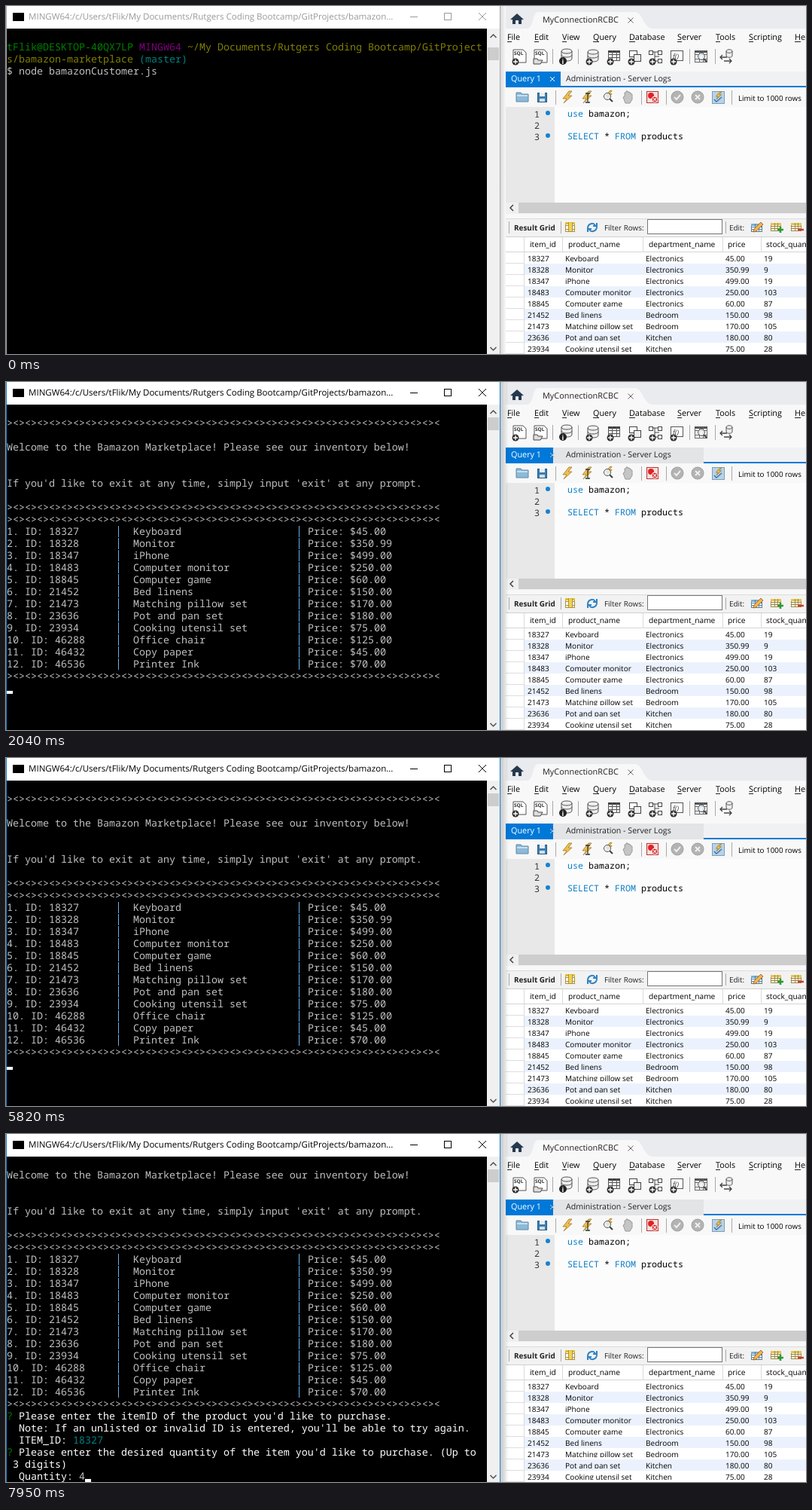
Recreate the animation shown at these times as an HTML page with a canvas. Size 1063 px wide and 462 px high, loop 8 s.

```html
<!DOCTYPE html>
<html lang="en">
<head>
<meta charset="utf-8">
<title>Marketplace terminal</title>
<style>
html, body { margin: 0; width: 100%; height: 100%; overflow: hidden; background: #fff; }
canvas { display: block; }
</style>
</head>
<body>
<canvas id="stage" width="1063" height="462"></canvas>
<script>
const ctx = document.getElementById('stage').getContext('2d');
const UI = '"Open Sans", "Noto Sans", sans-serif';
const MONO = '"Noto Sans Mono", "DejaVu Sans Mono", monospace';
const LOOP = 8000;
const GREY = '#c0c0c0', GREEN = '#008000', TEAL = '#008080';

const products = [
  [18327, 'Keyboard', '45.00', 'Electronics', 19],
  [18328, 'Monitor', '350.99', 'Electronics', 9],
  [18347, 'iPhone', '499.00', 'Electronics', 19],
  [18483, 'Computer monitor', '250.00', 'Electronics', 103],
  [18845, 'Computer game', '60.00', 'Electronics', 87],
  [21452, 'Bed linens', '150.00', 'Bedroom', 98],
  [21473, 'Matching pillow set', '170.00', 'Bedroom', 105],
  [23636, 'Pot and pan set', '180.00', 'Kitchen', 80],
  [23934, 'Cooking utensil set', '75.00', 'Kitchen', 28],
  [46288, 'Office chair', '125.00'],
  [46432, 'Copy paper', '45.00'],
  [46536, 'Printer Ink', '70.00']
];

// [start ms, screen, typed text, cursor visible]
const steps = [
  [0, 'shell', '', 0], [1170, 'shell', '', 1], [1200, 'run', '', 1], [1680, 'run', '', 0],
  [2010, 'intro', '', 1], [2040, 'list', '', 1], [2070, 'item', '', 1], [2190, 'item', '', 0],
  [2640, 'item', '', 1], [3120, 'item', '', 0], [3600, 'item', '', 1], [4080, 'item', '', 0],
  [4230, 'item', '1', 1], [4530, 'item', '18', 1], [4560, 'item', '18', 0],
  [5010, 'item', '183', 1], [5040, 'item', '183', 0], [5400, 'list', '', 1],
  [5430, 'item', '1832', 1], [5520, 'item', '1832', 0], [5820, 'list', '', 1],
  [5850, 'item', '18327', 1], [6000, 'item', '18327', 0], [6210, 'list', '', 1],
  [6240, 'amount', '', 1], [6480, 'amount', '', 0], [6960, 'amount', '', 1],
  [7410, 'amount', '4', 1], [7440, 'amount', '4', 0], [7950, 'amount', '4', 1]
];
// cursor row and column before any typed text
const cursorHome = {
  shell: [3, 26], run: [4, 0], intro: [9, 0], list: [23, 0], item: [25, 11], amount: [26, 12]
};

function rect(x, y, w, h, color) {
  ctx.fillStyle = color;
  ctx.fillRect(x, y, w, h);
}
function box(x, y, w, h, fill, stroke) {
  rect(x, y, w, h, fill);
  ctx.strokeStyle = stroke;
  ctx.lineWidth = 1;
  ctx.strokeRect(x + .5, y + .5, w - 1, h - 1);
}
function text(s, x, y, size = 10.8, color = '#000', family = UI, weight = '') {
  ctx.font = `${weight} ${size}px ${family}`;
  ctx.fillStyle = color;
  ctx.fillText(s, x, y);
}
function path(d, x, y, stroke, width = 1, fill) {
  const p = new Path2D(d);
  ctx.save();
  ctx.translate(x, y);
  if (fill) { ctx.fillStyle = fill; ctx.fill(p); }
  if (stroke) { ctx.strokeStyle = stroke; ctx.lineWidth = width; ctx.stroke(p); }
  ctx.restore();
}
function disc(x, y, r, fill, stroke) {
  ctx.beginPath();
  ctx.arc(x, y, r, 0, 7);
  ctx.fillStyle = fill;
  ctx.fill();
  if (stroke) { ctx.strokeStyle = stroke; ctx.lineWidth = 1; ctx.stroke(); }
}
function cross(x, y, r, color, width = 1) {
  path(`M${-r} ${-r}L${r} ${r}M${r} ${-r}L${-r} ${r}`, x, y, color, width);
}
function plus(x, y) {
  disc(x, y, 4.5, '#333');
  path('M-3 0H3M0-3V3', x, y, '#fff', 1.3);
}
function bolt(x, y, s = 1) {
  path(`M${2 * s} ${-8 * s}L${-6 * s} ${2 * s}H${-s}L${-5 * s} ${8 * s}L${6 * s} ${-2 * s}H${s}L${6 * s} ${-8 * s}Z`, x, y, '#9a7a30', .8, '#f5bd45');
}
function magnifier(x, y) {
  path('M3 3L7 7', x, y, '#444', 2.2);
  disc(x, y, 4.5, 'rgba(235,242,248,.8)', '#555');
}
function cylinder(x, y) {
  path('M-7-5V5C-7 9 7 9 7 5V-5C7-9-7-9-7-5C-7-1 7-1 7-5M-7 0C-7 4 7 4 7 0', x, y, '#555', 1, '#eee');
}
function grid(x, y, w, h, color, head) {
  box(x, y, w, h, '#fff', color);
  rect(x, y, w, 3, head);
  for (let i = 1; i < 3; i++) {
    rect(x, y + Math.round(h * i / 3), w, 1, color);
    rect(x + Math.round(w * i / 3), y, 1, h, color);
  }
}
function separators(xs, y, h) {
  xs.forEach(x => rect(x, y, 1, h, '#a9a9a9'));
}

function mainToolbar() {
  for (const x of [682, 710]) {
    path('M-8-9H5L9-5V8H-8Z', x, 67, '#555', 1, '#fff');
    text('SQL', x - 7, 65, 6.5, '#333', UI, 'bold');
  }
  plus(677, 74);
  path('M-5-3H0L1-1H7L4 4H-5Z', 706, 73, '#444', 1, '#ddd');
  cylinder(745, 65);
  disc(740, 73, 5, '#222');
  text('i', 738.6, 76.5, 9, '#fff', UI, 'bold');
  cylinder(780, 66);
  grid(800, 59, 16, 14, '#555', '#444');
  box(828, 59, 11, 9, '#fff', '#444');
  box(834, 64, 10, 10, '#eee', '#444');
  path('M-6-6H0V6H7M0-6H6M0 0H6', 862, 67, '#444');
  for (const [x, y] of [[854, 59], [866, 59], [866, 70]]) box(x, y, 6, 6, '#fff', '#444');
  box(883, 59, 17, 14, '#fff', '#555');
  text('f()', 886, 70, 9, '#333', UI, 'italic');
  [775, 803, 831, 859, 887].forEach(x => plus(x, 74));
  grid(915, 59, 17, 16, '#666', '#555');
  magnifier(924, 67);
  path('M-4-3V3C-4 6 4 6 4 3V-3C4-6-4-6-4-3C-4 0 4 0 4-3', 961, 63, '#555', 1, '#eee');
  path('M-7 2H2M-4-1L-7 2L-4 5M-2 7H8M5 4L8 7L5 10', 956, 66, '#444', 1.3);
  separators([726, 760, 908, 942], 57, 20);
}

function queryToolbar() {
  path('M-8-6H-2L0-4H8V6H-8Z', 686, 121, '#5b8bab', 1, '#8dbad6');
  rect(679, 118, 14, 2, '#c9e0ee');
  box(706, 115, 13, 13, '#3b7fb0', '#28597f');
  rect(709, 115, 7, 5, '#e8eef4');
  rect(709, 123, 7, 4, '#d2dee8');
  bolt(746, 121);
  bolt(772, 121);
  path('M-3-6H3M0-6V6M-3 6H3', 773, 122, '#333', 1.3);
  bolt(801, 118, .7);
  magnifier(799, 120);
  path('M-6 0L-4-1V-6H-2V-8H0V-7H2V-6H4V-4H6V3L3 8H-3Z', 826, 121, '#999', 1, '#c5c5c5');
  box(851, 113, 16, 16, '#f3dede', '#b33');
  disc(857, 119, 4, '#d22');
  disc(862, 124, 4, '#d22', '#fff');
  cross(862, 124, 1.8, '#fff', 1.2);
  disc(892, 121, 8, '#b3b3b3', '#a1a1a1');
  path('M-4 0L-1 3L4-3', 892, 121, '#eee', 2);
  disc(919, 121, 8, '#b3b3b3', '#a1a1a1');
  cross(919, 121, 3, '#eee', 2);
  box(938, 113, 17, 17, '#b9d2e8', '#7f9db5');
  bolt(947, 119, .6);
  path('M-5 4L-2 7L5 1', 946, 120, '#3879a8', 1.5);
  separators([730, 844, 877, 964], 112, 19);
  text('Limit to 1000 rows', 973, 126, 9.8);
}

function resultGrid() {
  rect(664, 282, 399, 24, '#f2f2f2');
  rect(664, 282, 399, 1, '#dcdcdc');
  separators([668, 737, 956], 286, 16);
  text('Result Grid', 675, 298, 9.95, '#222', UI, 'bold');
  grid(743, 287, 13, 13, '#ab913b', '#e1bd37');
  rect(748, 288, 4, 11, '#f2d252');
  path('M-6 1C-6-5 1-7 4-3M6-6V-2H1M6-1C6 5-1 7-4 3M-6 6V2H-1', 779, 294, '#2f83c5', 2);
  text('Filter Rows:', 795, 298, 9.9, '#222');
  box(852, 283, 100, 20, '#fff', '#777');
  text('Edit:', 961, 298, 9.9, '#222');
  grid(990, 289, 15, 11, '#5580a0', '#7caed0');
  path('M-6 6L-5 2L4-7L7-4L-2 5Z', 999, 294, '#a36a28', 1, '#f3b44f');
  grid(1016, 288, 14, 11, '#9d8944', '#e7c446');
  path('M-4 0H4M0-4V4', 1029, 297, '#2c9a35', 2.5);
  grid(1043, 288, 14, 11, '#9d8944', '#e7c446');
  path('M-4 0H4', 1056, 297, '#d23a2f', 2.5);

  rect(664, 306, 399, 156, '#fff');
  rect(664, 306, 399, 1, '#cfcfcf');
  ['item_id', 'product_name', 'department_name', 'price', 'stock_quantity'].forEach((s, i) =>
    text(s, [696, 747, 854, 959, 1010][i], 320, 10.2));
  // each row hides the descenders of its text
  products.slice(0, 9).forEach(([id, name, price, dept, stock], i) => {
    const y = 327 + i * 15, back = i % 2 ? '#ebf2fd' : '#fff';
    rect(689, y, 374, 15, back);
    [id, name, dept, price, stock].forEach((s, k) =>
      text(s, [693, 743, 850, 956, 1007][k], y + 12, 10.05));
    rect(689, y + 12, 374, 3, back);
    rect(664, y + 14, 25, 1, '#dedede');
  });
  rect(664, 326, 399, 1, '#d5d5d5');
  [688, 739, 846, 952, 1003].forEach((x, i) => rect(x, 307, 1, i ? 20 : 155, '#dadada'));
}

function workbench(t) {
  rect(657, 0, 406, 462, '#f8f8f8');
  rect(664, 0, 399, 30, '#e9ebee');
  path('M693 30C701 29 699 8 707 8H836C846 8 847 29 859 30Z', 0, 0, '', 1, '#f8f8f8');
  path('M-9 1L0-7L9 1H6V7H2V2H-2V7H-6V1Z', 679, 17, '', 1, '#26394d');
  text('MyConnectionRCBC', 713, 22, 10.9, '#222');
  cross(830, 19, 3.5, '#666');

  const menu = { File: 666, Edit: 702, View: 739, Query: 780, Database: 828, Server: 892, Tools: 943, Scripting: 987, Help: 1048 };
  for (const [s, x] of Object.entries(menu)) {
    text(s, x, 45);
    rect(x, 47, Math.round(ctx.measureText(s[0]).width), 1, '#222');
  }
  mainToolbar();

  const hover = t < 210, blue = '#0078d7';
  rect(664, 87, 399, 21, '#f0f1f3');
  if (!hover) rect(727, 87, 200, 21, '#e3e4e6');
  rect(664, 87, hover ? 73 : 63, 21, blue);
  text('Query 1', 671, 100, 10.84, '#fff');
  cross(726, 97, 3, hover ? '#fff' : '#a7c6df');
  text('Administration - Server Logs', 744, 100, 10.65, '#222');
  rect(hover ? 664 : 927, 106, 399, 2, blue);
  queryToolbar();

  rect(664, 134, 399, 127, '#fcfcfc');
  rect(664, 134, 65, 127, '#e8e8e8');
  for (let i = 0; i < 3; i++) text(i + 1, 702, 147.5 + i * 15, 11.67, '#333', MONO);
  disc(720, 142, 3, '#1283d6');
  disc(720, 172, 3, '#1283d6');
  const code = (s, col, y, color) => text(s, 746 + col * 7, y, 11.67, color, MONO);
  code('use', 0, 147, '#0b7fc7');
  code('bamazon;', 4, 147, '#000');
  code('SELECT', 0, 177, '#0b7fc7');
  code('*', 7, 177, '#000');
  code('FROM', 9, 177, '#0b7fc7');
  code('products', 14, 177, '#000');

  rect(664, 261, 399, 15, '#f0f0f0');
  rect(681, 261, 382, 14, '#cdcdcd');
  path('M2-4L-2 0L2 4', 672, 268, '#444', 1.5);
  resultGrid();
}

function put(row, col, s, color = GREY) {
  text(s, 1 + col * 8, 43 + row * 16, 13.333, color, MONO, 500);
}

function shellScreen() {
  put(1, 0, 'tFlik@DESKTOP-40QX7LP', GREEN);
  put(1, 22, 'MINGW64', '#800080');
  put(1, 30, '~/My Documents/Rutgers Coding Bootcamp/GitProject', '#808000');
  put(2, 0, 's/bamazon-marketplace', '#808000');
  put(2, 22, '(master)', TEAL);
  put(3, 0, '$ node bamazonCustomer.js');
}

function storeScreen(screen, typed) {
  const shift = screen === 'amount' ? 2 : 0;
  const line = (row, col, s, color) => { if (row >= shift) put(row - shift, col, s, color); };
  const bar = (row, col) => rect(5 + col * 8, 31 + (row - shift) * 16, 1, 15, '#6ab0e8');
  const rule = '><'.repeat(36);
  line(1, 0, rule);
  line(3, 0, 'Welcome to the Bamazon Marketplace! Please see our inventory below!');
  line(6, 0, "If you'd like to exit at any time, simply input 'exit' at any prompt.");
  line(8, 0, rule);
  if (screen === 'intro') return;

  line(9, 0, rule);
  products.forEach(([id, name, price], i) => {
    const row = 10 + i;
    line(row, 0, `${i + 1}. ID: ${id}`);
    bar(row, 18);
    line(row, 21, name);
    bar(row, 48);
    line(row, 50, `Price: $${price}`);
  });
  line(22, 0, rule);
  if (screen === 'list') return;

  line(23, 0, '?', GREEN);
  line(23, 2, "Please enter the itemID of the product you'd like to purchase.", '#fff');
  line(24, 2, "Note: If an unlisted or invalid ID is entered, you'll be able to try again.", '#fff');
  line(25, 2, 'ITEM_ID:', '#fff');
  if (screen === 'item') return line(25, 11, typed);

  line(25, 11, '18327', TEAL);
  line(26, 0, '?', GREEN);
  line(26, 2, "Please enter the desired quantity of the item you'd like to purchase. (Up to", '#fff');
  line(27, 1, '3 digits)', '#fff');
  line(28, 2, 'Quantity:', '#fff');
  line(28, 12, typed);
}

function terminal(t) {
  const [, screen, typed, cursorOn] = steps.findLast(s => s[0] <= t);
  const active = t >= 690, ink = active ? '#000' : '#999';
  const glow = ctx.createLinearGradient(657, 0, active ? 668 : 664, 0);
  glow.addColorStop(0, active ? 'rgba(0,0,0,.2)' : 'rgba(0,0,0,.12)');
  glow.addColorStop(1, 'rgba(0,0,0,0)');
  rect(657, 0, 11, 462, glow);

  rect(0, 0, 657, 462, active ? '#1883d7' : '#aaa');
  rect(1, 0, 655, 30, '#fff');
  rect(9, 9, 15, 11, '#000');
  text('MINGW64:/c/Users/tFlik/My Documents/Rutgers Coding Bootcamp/GitProjects/bamazon...', 30, 18, 11.56, ink);
  rect(537, 14, 10, 1, ink);
  box(582, 9, 10, 10, '#fff', ink);
  cross(633, 14, 5, ink);

  rect(1, 30, 638, 432, '#000');
  rect(639, 30, 17, 432, '#f0f0f0');
  rect(640, t < 2010 ? 55 : 47, 15, 17, '#cdcdcd');
  path('M-4 2L0-2L4 2', 647.5, 40, '#505050', 1.5);
  path('M-4-2L0 2L4-2', 647.5, 455, '#505050', 1.5);

  if (screen === 'shell' || screen === 'run') shellScreen();
  else storeScreen(screen, typed);
  if (cursorOn) {
    const [row, col] = cursorHome[screen];
    rect(1 + (col + typed.length) * 8, 42 + row * 16, 8, 4, '#fff');
  }
}

function draw() {
  const t = performance.now() % LOOP;
  ctx.textRendering = 'geometricPrecision';
  workbench(t);
  terminal(t);
  requestAnimationFrame(draw);
}
draw();
</script>
</body>
</html>
```
